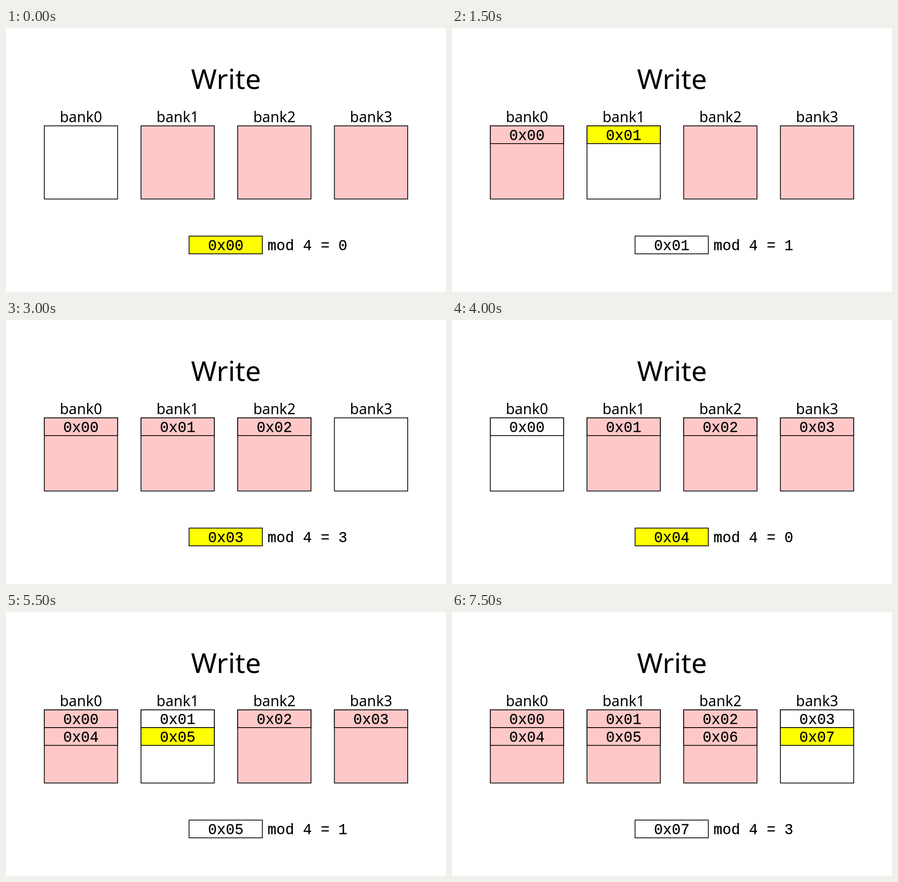
These frames come from a looping animation (965 px wide and 580 px high, 8000 ms). An HTML page:

```html
<!DOCTYPE html>
<html lang="en">
<head>
<meta charset="utf-8">
<title>Write</title>
<style>
  html, body { margin: 0; width: 100%; height: 100%; overflow: hidden; background: #fff; }
  svg { display: block; }
  rect { stroke: #000; stroke-width: 1.7; }
  text { fill: #000; text-anchor: middle; }
  .label { font: 32px "Noto Sans", "Open Sans", sans-serif; }
  .title { font: 61px "Noto Sans", "Open Sans", sans-serif; }
  .mono { font: 32.4px "Liberation Mono", "Noto Sans Mono", monospace; stroke: #000; stroke-width: 0.3; }
  .start { text-anchor: start; }
</style>
</head>
<body>
<svg id="stage" width="965" height="580" viewBox="0 0 965 580"></svg>
<script>
const STEP = 500, WRITES = 8, BANKS = 4;
const SIZE = 160.7, CELL = 39, TOP = 215, LEFT = 84, PITCH = 212.1;
const PINK = '#ffc8c8', YELLOW = '#ffff00', WHITE = '#ffffff';
const stage = document.getElementById('stage');

function add(tag, attrs, content = '') {
  const node = document.createElementNS('http://www.w3.org/2000/svg', tag);
  for (const key in attrs) node.setAttribute(key, attrs[key]);
  node.textContent = content;
  return stage.appendChild(node);
}

const box = (x, y, height) => add('rect', { x, y, width: SIZE, height, fill: WHITE });
const write = (kind, x, y, content) => add('text', { class: kind, x, y }, content);
const address = n => '0x' + n.toString(16).padStart(2, '0');
const bankX = bank => LEFT + bank * PITCH;

write('title', 482.5, 134, 'Write');

const banks = Array.from({ length: BANKS }, (_, i) => {
  write('label', bankX(i) + SIZE / 2, 207, 'bank' + i);
  return box(bankX(i), TOP, SIZE);
});

const cells = Array.from({ length: WRITES }, (_, n) => {
  const x = bankX(n % BANKS);
  const y = TOP + Math.floor(n / BANKS) * CELL;
  return { rect: box(x, y, CELL), text: write('mono', x + SIZE / 2, y + 31, address(n)) };
});

const input = box(401.5, 457.2, CELL);
const inputText = write('mono', 482, 488, '');
const formula = write('mono start', 573.5, 488, '');

function render(time) {
  const step = Math.floor(time / STEP) % (WRITES * 2);
  const current = step >> 1;
  const stored = step % 2 === 1;
  const active = current % BANKS;
  const bankColor = bank => bank === active ? WHITE : PINK;

  banks.forEach((rect, i) => rect.setAttribute('fill', bankColor(i)));
  cells.forEach(({ rect, text }, n) => {
    const isNew = n === current && stored;
    const visibility = n < current || isNew ? 'visible' : 'hidden';
    rect.setAttribute('visibility', visibility);
    text.setAttribute('visibility', visibility);
    rect.setAttribute('fill', isNew ? YELLOW : bankColor(n % BANKS));
  });
  input.setAttribute('fill', stored ? WHITE : YELLOW);
  inputText.textContent = address(current);
  formula.textContent = `mod ${BANKS} = ${active}`;
}

const start = performance.now();
function tick() {
  render(performance.now() - start);
  requestAnimationFrame(tick);
}
tick();
</script>
</body>
</html>
```
